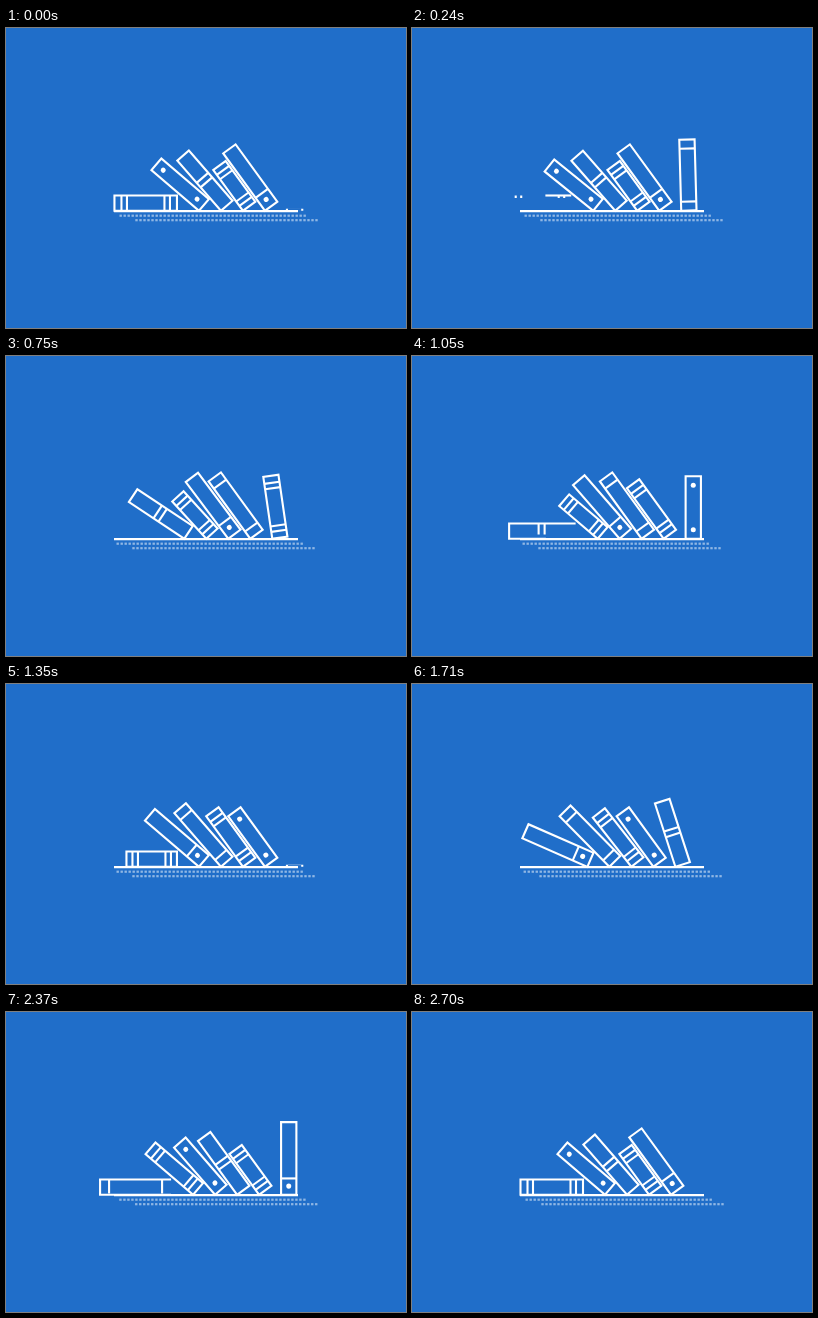
An HTML page that plays this animation: 400x300 px, repeating every 2730 ms.

```html
<!DOCTYPE html>
<html lang="en">
<head>
<meta charset="utf-8">
<title>Bookshelf loader</title>
<style>
  html, body { margin: 0; width: 100%; height: 100%; overflow: hidden; background: #206ec9; }
  svg { display: block; width: 400px; height: 300px; }
  .book { fill: none; stroke: #fff; stroke-width: 2.1; }
  .book circle { fill: #fff; stroke: none; }
</style>
</head>
<body>
<svg id="stage" viewBox="0 0 400 300">
  <g id="dots" fill="#fff" fill-opacity=".5"></g>
  <path d="M108 183.2H292" stroke="#fff" stroke-width="2.2"/>
</svg>
<script>
// The cycle rests briefly before it repeats.
const LOOP = 2730, CYCLE = 2700, STEP = CYCLE / 6;
const WIDTH = 15.3, ENTRY = 281, BASE = 182.8, SPACING = 22;
const DOT_PITCH = 4, SWAY = 3, SWAY_TIME = 300;

// Bands and dots are heights above the foot of the book.
const BOOKS = [
  { height: 71, bands: [9, 62], dots: [] },
  { height: 62.5, bands: [7, 12.5, 50, 55.5], dots: [] },
  { height: 62.5, bands: [], dots: [9, 53.5] },
  { height: 66.5, bands: [31, 37], dots: [] },
  { height: 50.5, bands: [6, 11.5, 39, 44.5], dots: [] },
  { height: 71, bands: [16], dots: [8.5] }
];

// Falls: start, end, added tilt, easing power
const FALLS = [
  [0.47, 1, 36, 1.5],
  [2.45, 3, 5, 2],
  [3.45, 4, 8.5, 2],
  [4.4, 5, 40.5, 2.2]
];

const stage = document.getElementById('stage');
const dots = document.getElementById('dots');

function add(parent, tag, attrs) {
  const el = document.createElementNS('http://www.w3.org/2000/svg', tag);
  for (const key in attrs) el.setAttribute(key, attrs[key]);
  return parent.appendChild(el);
}

function dotRow(x, y, count) {
  for (let i = 0; i < count; i++) {
    add(dots, 'rect', { x: x + i * DOT_PITCH, y, width: 2.4, height: 2.2 });
  }
}

function makeBook({ height, bands, dots }) {
  const group = add(stage, 'g', { class: 'book' });
  const line = d => add(group, 'path', { d, pathLength: 1 });
  const lines = [
    line(`M${WIDTH} 0H0V${-height}H${WIDTH}Z`),
    ...bands.map(b => line(`M0 ${-b}H${WIDTH}`))
  ];
  const circles = dots.map(d => add(group, 'circle', { cx: WIDTH / 2, cy: -d }));
  return { group, lines, circles };
}

const progress = (v, from, to) => Math.min(1, Math.max(0, (v - from) / (to - from)));

function easeOutBack(p, s = 1.25) {
  const q = p - 1;
  return 1 + (s + 1) * q ** 3 + s * q ** 2;
}

function tilt(v) {
  return FALLS.reduce((sum, [from, to, angle, power]) =>
    sum + angle * progress(v, from, to) ** power, 0);
}

function poseBook({ group, lines, circles }, v) {
  const grown = easeOutBack(progress(v, 0, 0.32));
  const erased = progress(v, 5.237, 5.595);
  const left = 1 - erased;
  group.style.display = grown > 0 && left > 0 ? '' : 'none';
  group.setAttribute('transform',
    `translate(${ENTRY - SPACING * v} ${BASE}) rotate(${-tilt(v)}) scale(1 ${grown})`);
  const dash = erased ? `0 ${erased} ${left} 2` : 'none';
  lines.forEach(el => el.setAttribute('stroke-dasharray', dash));
  circles.forEach(el => el.setAttribute('r', 2.5 * Math.sqrt(left)));
}

dotRow(113.5, 186.6, 47);
dotRow(129.3, 191.1, 46);
const books = BOOKS.map(makeBook);
const start = performance.now();

function draw(now) {
  const t = Math.min(Math.max(0, now - start) % LOOP, CYCLE);
  books.forEach((book, i) => poseBook(book, (t / STEP - i + 6) % 6));
  const shift = -SWAY * (1 - Math.cos(2 * Math.PI * t / SWAY_TIME)) / 2;
  dots.setAttribute('transform', `translate(${shift} 0)`);
  requestAnimationFrame(draw);
}
draw(start);
</script>
</body>
</html>
```
